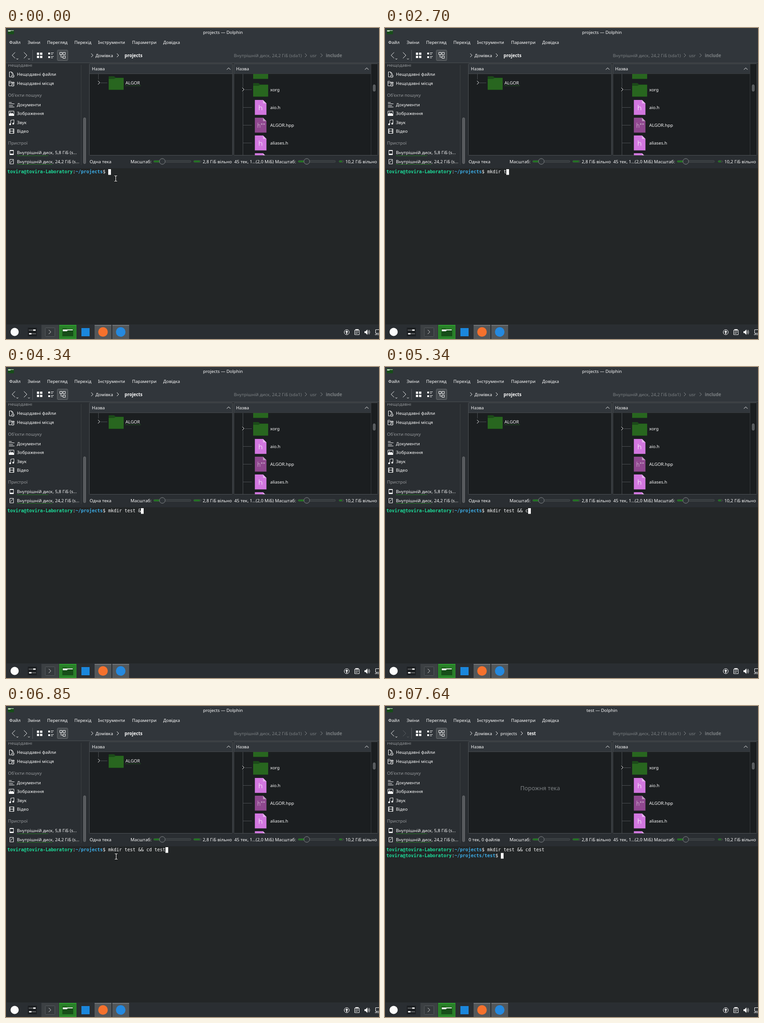
An HTML page for the animation above (8000 ms loop, 821 by 683 pixels).

```html
<!DOCTYPE html>
<html lang="uk">
<head>
<meta charset="utf-8">
<title>Файловий менеджер з терміналом</title>
<style>
html, body { margin: 0; width: 100%; height: 100%; overflow: hidden; background: #232627; }
svg { display: block; width: 821px; height: 683px; }
text { font: 9.75px "Noto Sans", sans-serif; fill: #fcfcfc; white-space: pre; }
.bold { font-weight: 700; }
.dim, .dim text { fill: #7c8083; }
.heading { fill: #95989b; }
.mono text { font: 9.966px "DejaVu Sans Mono", monospace; }
.mono .user { font-weight: 700; fill: #1cdc9a; }
.mono .path { font-weight: 700; fill: #3daee9; }
.line { fill: none; stroke: #fcfcfc; }
.tree { fill: none; stroke: #4b4f52; }
.frame { fill: #1b1e20; stroke: #4d5154; }
.head { fill: #31363b; }
.green { fill: #247024; }
.groove { fill: #33383b; stroke: #53575a; stroke-width: .7; }
.knob { fill: #2e3337; stroke: #85898c; }
.thumb { fill: #56595c; stroke: #7a7d80; stroke-width: .7; }
</style>
</head>
<body>
<svg viewBox="0 0 821 683">
  <defs>
    <path id="chevron" class="line" d="M-2-4l4 4-4 4"/>
    <path id="up" class="line" d="M-4 2l4-4 4 4"/>
    <g id="folder">
      <path d="M0 1q0-1 1-1h11l3 3h17q1 0 1 1v8H0z" fill="#1c4a19"/>
      <path d="M0 6h12l3-2h18v25q0 1-1 1H1q-1 0-1-1z" fill="#28661f"/>
      <path d="M0 29.600h33" stroke="#1d4c19" stroke-width=".8"/>
    </g>
    <g id="page">
      <path d="M0 0h18l7.500 7.500V33H0z"/>
      <path d="M18 0v7.500h7.500z" fill="#fff" fill-opacity=".45"/>
      <path d="M0 32.600h25.500" stroke="#000" stroke-opacity=".25" stroke-width=".8"/>
    </g>
    <g id="header">
      <use href="#page" fill="#d277df"/>
      <path d="M9.500 11v11.500M9.500 17.500q1-2.500 3.500-2.500t2.500 3v4.500" class="line" opacity=".9"/>
    </g>
    <g id="zoom">
      <text x="0" y="296.500">Масштаб:</text>
      <rect class="groove" x="51" y="291" width="82" height="4" rx="2"/>
      <rect class="green" x="51" y="291" width="15" height="4" rx="2"/>
      <circle class="knob" cx="70" cy="293" r="6.300"/>
    </g>
    <g id="appFolder">
      <path d="M0 1h9l2 2h13v5H0z" fill="#1d601b"/>
      <path d="M1 4h22v5H1z" fill="#e9eeea"/>
      <path d="M0 8h10l2-2h12v13H0z" fill="#174d19"/>
    </g>
    <clipPath id="placesClip"><path d="M2 80h162v222H2z"/></clipPath>
    <clipPath id="rightClip"><path d="M502 101h301v178.500H502z"/></clipPath>
  </defs>

  <!-- Window, title and menu -->
  <rect width="821" height="683" fill="#2a2e32"/>
  <rect class="head" width="821" height="77"/>
  <path d="M0 76.500h821" stroke="#4a4e52"/>
  <use href="#appFolder" transform="translate(4 3) scale(.56)"/>
  <text id="title" x="477.500" y="12.800" text-anchor="middle"></text>
  <g>
    <text x="7" y="35">Файл</text><text x="47.500" y="35">Зміни</text>
    <text x="90.500" y="35">Перегляд</text><text x="150.500" y="35">Перехід</text>
    <text x="202.500" y="35">Інструменти</text><text x="277.500" y="35">Параметри</text>
    <text x="346" y="35">Довідка</text>
  </g>

  <!-- Toolbar -->
  <path class="line" d="M20 53.500l-6.500 6.500 6.500 6.500M23 67l2 2 2-2"/>
  <path class="line" id="forward" d="M39.500 53.500l6.500 6.500-6.500 6.500M48.500 67l2 2 2-2"/>
  <path d="M58.500 48v24" stroke="#565a5e"/>
  <path d="M68 54h5v5h-5zm7 0h5v5h-5zm-7 7h5v5h-5zm7 0h5v5h-5zM93 54h4v4h-4zm0 8h4v4h-4z" fill="#fcfcfc"/>
  <path class="line" d="M99 54.500h6M99 57.500h4M99 62.500h6M99 65.500h4"/>
  <rect x="113" y="48.500" width="23" height="23" rx="2" fill="#454a4e" stroke="#6a6e71"/>
  <path class="line" d="M118.500 53.500h5v5h-5zM125.500 53.500h5v5h-5zM125.500 61.500h5v5h-5zM121 59v5h4"/>
  <use href="#chevron" x="189.500" y="60"/>
  <text x="197" y="63.500">Домівка</text>
  <use href="#chevron" x="246" y="60"/>
  <text id="crumbHere" class="bold" x="261" y="63.500">projects</text>
  <g id="crumbDeeper">
    <text x="254" y="63.500">projects</text>
    <use href="#chevron" x="301" y="60"/>
    <text class="bold" x="313" y="63.500">test</text>
  </g>
  <g class="dim">
    <text x="501.500" y="63.500">Внутрішній диск, 24,2 ГіБ (sda1)</text>
    <text x="669" y="63.500">usr</text>
    <text x="704" y="63.500" class="bold">include</text>
    <g opacity=".45"><use href="#chevron" x="660" y="60"/><use href="#chevron" x="694.500" y="60"/></g>
  </g>

  <!-- Places -->
  <g clip-path="url(#placesClip)">
    <text class="heading" x="4.500" y="84.500">Нещодавні</text>
    <text x="24" y="105">Нещодавні файли</text>
    <text x="24" y="124.700">Нещодавні місця</text>
    <text class="heading" x="4.500" y="150.500">Об'єкти пошуку</text>
    <text x="24" y="171.500">Документи</text>
    <text x="24" y="191">Зображення</text>
    <text x="24" y="210.500">Звук</text>
    <text x="24" y="230">Відео</text>
    <text class="heading" x="4.500" y="256">Пристрої</text>
    <text x="24" y="277">Внутрішній диск, 5,8 ГіБ (s...</text>
    <text x="24" y="296.500">Внутрішній диск, 24,2 ГіБ (s...</text>
  </g>
  <path d="M24 280.500h131M24 299.500h136" stroke="#34393c"/>
  <path d="M24 280.500h69M24 299.500h78" stroke="#287a28"/>
  <g class="line">
    <path d="M12 107.500H7.500v-11h5l3 3v3M12.500 96.500v3h3M12 127H6.500v-10h4l1.500 2h6v3M6.500 120.500h11"/>
    <circle cx="15" cy="105.500" r="3"/><circle cx="15" cy="125" r="3"/>
    <path d="M15 104v2h1.500M15 123.500v2h1.500"/>
    <path d="M6.500 163.500h6M6.500 166.500h12M6.500 170.500h9M6.500 173.500h12"/>
    <path d="M6.500 182.500h11v10h-11zM7 191l3-4 2 2 2-2 3 4M9 185h2"/>
    <path d="M10.500 211v-8.500l7-1v8"/>
    <path d="M7.500 221.500h10v10h-10zM7.500 226.500h10M9 221v11M16 221v11"/>
    <path d="M8.500 268.500h8v10h-8zM8.500 276.500h8M8.500 288.500h8v10h-8zM10 296l5-6"/>
  </g>
  <path d="M7 189l3-3 2 2 2-2 3 4v2H7zM9 268h7v2H9zM9 276h7v2H9z" fill="#fcfcfc"/>
  <circle cx="9" cy="211.500" r="2" fill="#fcfcfc"/><circle cx="16" cy="210" r="2" fill="#fcfcfc"/>
  <path d="M165.500 81v220" stroke="#3c4043"/>
  <rect class="thumb" x="170.500" y="197" width="5" height="101" rx="2.500"/>

  <!-- Left view -->
  <rect class="frame" x="183.500" y="78.500" width="315" height="201" rx="1"/>
  <rect class="head" x="184" y="79" width="314" height="21"/>
  <path d="M184 100.500h314" stroke="#45494c"/>
  <text x="189" y="93.300">Назва</text>
  <use href="#up" x="490" y="89.500"/>
  <g id="projectsView">
    <path class="tree" d="M203.500 101v12M208 120.500h15"/>
    <use href="#chevron" x="204.500" y="120"/>
    <use href="#folder" x="226" y="106"/>
    <text x="263" y="124">ALGOR</text>
    <path d="M262 126.700h35" stroke="#225522"/>
  </g>
  <text id="emptyNote" class="dim" x="341.500" y="184.500" text-anchor="middle" style="font-size:12.75px">Порожня тека</text>
  <text id="status" x="184" y="296.500"></text>
  <use href="#zoom" x="274"/>
  <rect class="groove" x="413" y="291" width="17" height="4" rx="2"/>
  <rect class="green" x="413" y="291" width="14" height="4" rx="2"/>
  <text x="433" y="296.500">2,8 ГіБ вільно</text>

  <!-- Right view -->
  <rect class="frame" x="501.500" y="78.500" width="317" height="201" rx="1"/>
  <rect class="head" x="502" y="79" width="301" height="21"/>
  <path d="M502 100.500h301M803.500 79v200" stroke="#36393c"/>
  <text x="506.500" y="93.300">Назва</text>
  <use href="#up" x="794" y="89.500"/>
  <rect class="thumb" x="808" y="124.500" width="5" height="14.500" rx="2.500"/>
  <g clip-path="url(#rightClip)">
    <path class="tree" d="M521.500 101v29M521.500 140v140M526 135.500h15M521.500 174.500h19.500M521.500 213.500h19.500M521.500 252.500h19.500"/>
    <use href="#chevron" x="522" y="135"/>
    <use href="#folder" x="544" y="82"/>
    <use href="#folder" x="544" y="121"/>
    <use href="#header" x="547.750" y="158"/>
    <use href="#page" x="547.750" y="197" fill="#8f488f"/>
    <path d="M554.500 208v11M554.500 214q.5-2 2.500-2t2 2.500v4.500M561 211h4M563 209v4M566 211h4M568 209v4" class="line" opacity=".5"/>
    <use href="#header" x="547.750" y="236"/>
    <use href="#header" x="547.750" y="275"/>
    <text x="581.500" y="139">xorg</text>
    <text x="581.500" y="178">aio.h</text>
    <text x="581.500" y="216.700">ALGOR.hpp</text>
    <text x="581.500" y="255.500">aliases.h</text>
  </g>
  <text x="502.500" y="296.500">45 тек, 1…(2,0 МіБ)</text>
  <use href="#zoom" x="592"/>
  <rect class="groove" x="733" y="291" width="10.500" height="4" rx="2"/>
  <rect class="green" x="733" y="291" width="7" height="4" rx="2"/>
  <text x="747" y="296.500">10,2 ГіБ вільно</text>

  <!-- Terminal -->
  <rect x="1" y="308" width="820" height="343" fill="#232627"/>
  <g class="mono">
    <g>
      <text class="user" x="3" y="319.400">tovira@tovira-Laboratory</text><text x="147" y="319.400">:</text>
      <text class="path" x="153" y="319.400">~/projects</text><text x="213" y="319.400">$</text>
      <text id="command" x="225" y="319.400"></text>
    </g>
    <g id="nextPrompt">
      <text class="user" x="3" y="332.200">tovira@tovira-Laboratory</text><text x="147" y="332.200">:</text>
      <text class="path" x="153" y="332.200">~/projects/test</text><text x="243" y="332.200">$</text>
    </g>
    <rect id="caret" width="6" height="12.500" fill="#fcfcfc"/>
  </g>
  <g id="pointer" fill="none">
    <path id="beam" d="M-3-6h2l1 1 1-1h2M0-5v10M-3 6h2l1-1 1 1h2" stroke="#111" stroke-width="2.600"/>
    <use href="#beam" style="display:none"/>
    <path d="M-3-6h2l1 1 1-1h2M0-5v10M-3 6h2l1-1 1 1h2" stroke="#fff" stroke-width="1.100"/>
  </g>

  <!-- Taskbar -->
  <rect y="651" width="821" height="32" fill="#2a2e32"/>
  <circle cx="19" cy="667.500" r="9" fill="#fcfcfc"/>
  <rect x="48" y="658" width="20" height="19" rx="1" fill="#1d2023"/>
  <path class="line" d="M50 663.500h16M50 671.500h16" opacity=".6"/>
  <path d="M60 662h5v3h-5zM51 670h5v3h-5z" fill="#fcfcfc"/>
  <rect x="78" y="652" width="38" height="31" fill="#3c4043"/>
  <rect x="86.500" y="658.500" width="21" height="19" rx="1" fill="#34383b" stroke="#565a5d"/>
  <path class="line" d="M94 663l5 4.500-5 4.500" opacity=".8"/>
  <rect x="117.500" y="652.500" width="37" height="30" fill="#298029" stroke="#2f962f"/>
  <path d="M117 653h38" stroke="#30a030" stroke-width="2"/>
  <use href="#appFolder" x="124" y="658"/>
  <rect x="166" y="659" width="18" height="18" fill="#1b87dc"/>
  <path d="M195 652h37v31h-37zM234 652h37v31h-37z" fill="#53575a"/>
  <path d="M195 653h37M234 653h37" stroke="#707477" stroke-width="2"/>
  <circle cx="213.500" cy="667.500" r="10.500" fill="#f5712d"/>
  <circle cx="252.500" cy="667.500" r="10.500" fill="#2589df"/>
  <circle cx="750" cy="668" r="5.500" class="line"/>
  <path d="M750 664l3.500 4H751v4h-2v-4h-2.500z" fill="#fcfcfc"/>
  <path class="line" d="M767.500 663.500h10v10h-10zM769 667.500h7M769 670.500h5"/>
  <path d="M769 661.500h7v3h-7zM789 666h2.500l4-4v12l-4-4H789z" fill="#fcfcfc"/>
  <path class="line" d="M797 665q2 3 0 6M798.500 663q4 5 0 10"/>
  <path class="line" d="M821 662.500h-7.500v8h7.500M812 673.500h4v-3M817 673.500h4"/>
</svg>
<script>
const LOOP = 8000;
const COMMAND = "mkdir test && cd test";
const KEY_TIMES = [720, 980, 1310, 1440, 1710, 1900, 2700, 2760, 3030, 3090, 3420,
  4340, 4470, 4740, 5340, 5660, 5800, 6060, 6120, 6320, 6380];
const ENTER = 6980, OPENED = 7510, COUNTED = 7570, SETTLED = 7640;
const CELL = 6, ROW = 12.75;

const el = id => document.getElementById(id);
const show = (id, visible) => el(id).style.display = visible ? "" : "none";
const setText = (id, value) => { if (el(id).textContent !== value) el(id).textContent = value; };
const between = (t, from, to) => t >= from && t < to;

function render(t) {
  const typed = KEY_TIMES.filter(key => key <= t).length;
  const entered = t >= ENTER, opened = t >= OPENED;

  setText("command", COMMAND.slice(0, typed));
  show("nextPrompt", entered);
  el("caret").setAttribute("x", entered ? 255 : 225 + typed * CELL);
  el("caret").setAttribute("y", entered ? 310 + ROW : 310);

  // Typing hides the pointer; a nudge of the mouse brings it back.
  show("pointer", t < 720 || between(t, 1800, 1900) || between(t, 6780, ENTER));
  el("pointer").setAttribute("transform", `translate(${t < 6850 ? 241.5 : 242.5} 330.5)`);

  setText("title", (opened ? "test" : "projects") + " — Dolphin");
  el("forward").style.opacity = opened ? .2 : 1;
  show("crumbHere", !opened);
  show("crumbDeeper", opened);
  show("projectsView", !opened);
  setText("status", t < COUNTED ? "Одна тека" : "0 тек, 0 файлів");
  show("emptyNote", t >= SETTLED);
}

const start = performance.now();
function tick() {
  render((performance.now() - start) % LOOP);
  requestAnimationFrame(tick);
}
tick();
</script>
</body>
</html>
```
